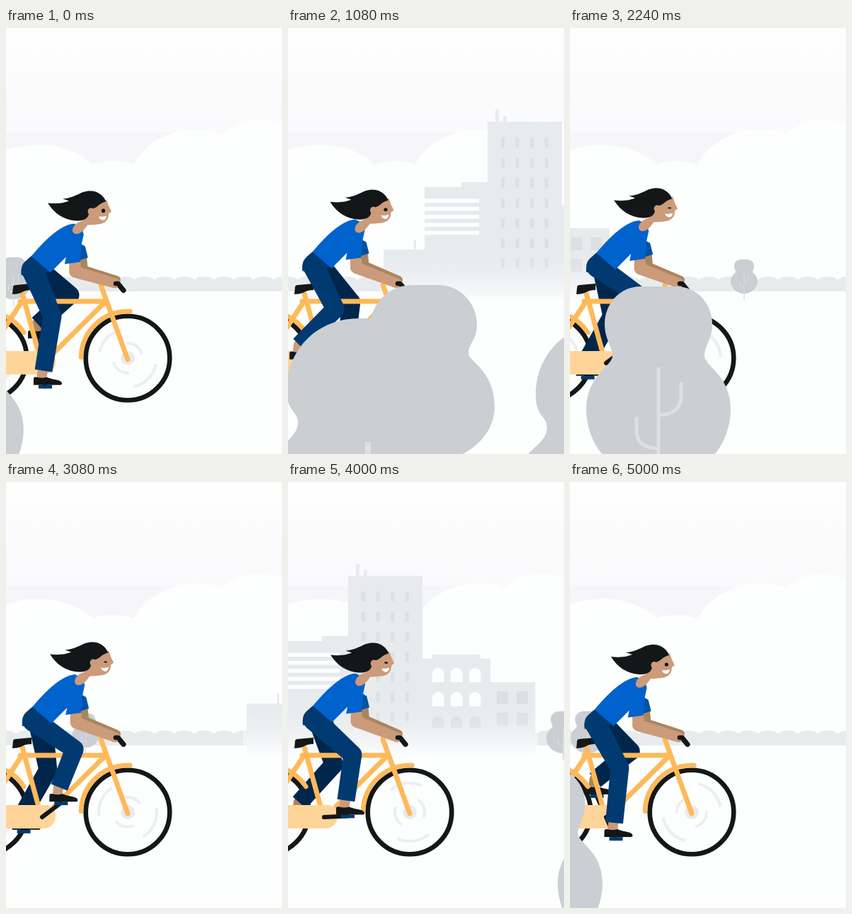
These frames come from a looping animation (390x600 px, 5.04 s). An HTML page with a canvas:

```html
<!DOCTYPE html>
<html lang="en">
<head>
<meta charset="utf-8">
<title>Cyclist</title>
<style>
html, body { margin: 0; width: 100%; height: 100%; overflow: hidden; background: #fdfefe; }
canvas { display: block; width: 390px; height: 600px; }
</style>
</head>
<body>
<canvas id="stage" width="390" height="600"></canvas>
<script>
const ctx = document.getElementById('stage').getContext('2d');
const LOOP = 5040, STEP = 40, TAU = Math.PI * 2, DEG = Math.PI / 180;
const C = {
  paper: '#fdfefe', haze: '#e8ebee', pane: '#dce0e4', tree: '#cbced3', trunk: '#dcdfe3',
  black: '#131718', orange: '#ffb959', guard: '#ffd498', navy: '#003a70', deep: '#00264c',
  shirt: '#0062cd', sleeve: '#0053a6', skin: '#cb9b7a', skinDark: '#a9855f'
};

function rect(x, y, w, h, color) {
  ctx.fillStyle = color;
  ctx.fillRect(x, y, w, h);
}
function fill(d, color) {
  ctx.fillStyle = color;
  ctx.fill(new Path2D(d));
}
function line(d, color, width, cap = 'round') {
  ctx.strokeStyle = color;
  ctx.lineWidth = width;
  ctx.lineCap = cap;
  ctx.lineJoin = 'round';
  ctx.stroke(new Path2D(d));
}
function oval(x, y, rx, ry, color) {
  ctx.fillStyle = color;
  ctx.beginPath();
  ctx.ellipse(x, y, rx, ry, 0, 0, TAU);
  ctx.fill();
}
function arc(x, y, r, from, to, color, width, cap = 'round') {
  ctx.strokeStyle = color;
  ctx.lineWidth = width;
  ctx.lineCap = cap;
  ctx.beginPath();
  ctx.arc(x, y, r, from * DEG, to * DEG);
  ctx.stroke();
}
function group(x, y, draw, sx = 1, sy = sx) {
  ctx.save();
  ctx.translate(x, y);
  ctx.scale(sx, sy);
  draw();
  ctx.restore();
}
function gradient(y0, y1, ...stops) {
  const g = ctx.createLinearGradient(0, y0, 0, y1);
  stops.forEach(([p, c]) => g.addColorStop(p, c));
  return g;
}

const sky = gradient(0, 147, [0, C.paper], [0.34, '#fdfdfe'], [0.35, '#fcfcfd'], [1, '#fafafc']);
const mist = gradient(318, 386, [0, 'rgba(253,254,254,0)'], [0.4, 'rgba(253,254,254,.18)'],
  [0.75, 'rgba(253,254,254,.58)'], [1, 'rgba(253,254,254,1)']);

// Position of something that passes x at time t0 while moving left at v px/ms.
function passing(t, x, t0, v) {
  const dt = ((t - t0 + LOOP * 1.5) % LOOP) - LOOP / 2;
  return x - v * dt;
}

function backdrop() {
  rect(0, 0, 390, 600, C.paper);
  rect(0, 0, 390, 147, sky);
  rect(0, 147, 390, 50, '#f6f5fa');
  fill('M0 172C45 157 95 165 122 192Q150 182 180 192C205 148 262 133 305 149C332 125 365 125 390 136V371H0Z', C.paper);
  rect(0, 357, 390, 14, C.haze);
  for (let x = 0; x < 410; x += 28) oval(x, 358, 15, 8, C.haze);
}

function city() {
  rect(135, 312, 58, 74, C.haze);
  rect(178, 298, 3, 15, C.haze);
  rect(193, 224, 89, 162, C.haze);
  rect(245, 217, 37, 8, C.haze);
  for (let i = 0; i < 5; i++) rect(193, 240.5 + i * 11.3, 77, 5.5, C.paper);

  rect(282, 132, 105, 254, C.haze);
  rect(293, 115, 5, 18, C.haze);
  rect(304, 124, 5, 9, C.haze);
  for (let row = 0; row < 7; row++)
    for (let col = 0; col < 4; col++) rect(301 + col * 20.6, 154.5 + row * 28.4, 5, 13.5, C.pane);

  rect(387, 249, 96, 137, C.haze);
  rect(400, 243, 69, 7, C.haze);
  for (let row = 0; row < 3; row++)
    for (let col = 0; col < 3; col++) {
      ctx.fillStyle = row < 2 ? C.paper : C.pane;
      ctx.beginPath();
      ctx.roundRect(401 + col * 26, 262 + row * 34, 16.5, row < 2 ? 20 : 16, [8, 8, 0, 0]);
      ctx.fill();
    }

  rect(483, 282, 63.5, 104, C.haze);
  for (const y of [295, 325])
    for (const x of [492, 520]) rect(x, y, 16, 18, C.pane);
  rect(130, 318, 420, 70, mist);
}

function tree(x, top, sx, sy = sx, stem = 270) {
  group(x, top, () => {
    if (stem > 270) line(`M0 240V${stem}`, C.trunk, 6, 'butt');
    fill('M-25 0H25C55 0 76 25 76 53C76 75 65 84 65 98C65 112 102 125 102 173C102 229 56 275 0 275' +
      'C-56 275 -102 229 -102 173C-102 125 -65 112 -65 98C-65 84 -76 75 -76 53C-76 25 -55 0 -25 0Z', C.tree);
    line(`M0 114V${stem}M32 135V153Q32 181 0 181M-31 184V202Q-31 228 0 228`, C.trunk, 5, 'butt');
  }, sx, sy);
}

function bush(x, y) {
  group(x, y, () => {
    fill('M-12 640V592C0 580 14 572 14 555C14 540 -2 540 -2 510C-2 452 42 409 100 409H117' +
      'C124 382 146 362 176 362H212C244 362 267 388 267 418C267 440 255 444 255 458C255 470 292 482 292 533' +
      'C292 563 272 590 240 603V640Z', C.tree);
    rect(108.5, 583, 8.5, 60, C.trunk);
  });
}

function wheel(x, y, spin) {
  oval(x, y, 10, 10, C.haze);
  for (const half of [0, 180]) {
    const a = spin + half;
    arc(x, y, 41, a - 33, a + 33, '#eceef1', 4, 'butt');
    arc(x, y, 21, a + 40, a + 120, '#eceef1', 4, 'butt');
  }
  arc(x, y, 59.3, 0, 360, C.black, 6.6);
}

// Tapered limb through points given as [x, y, radius]; the last end is cut flat.
function limb(points, color) {
  ctx.fillStyle = color;
  for (let i = 1; i < points.length; i++) {
    const [ax, ay, ar] = points[i - 1], [bx, by, br] = points[i];
    const d = Math.hypot(bx - ax, by - ay), nx = (ay - by) / d, ny = (bx - ax) / d;
    ctx.beginPath();
    ctx.moveTo(ax + nx * ar, ay + ny * ar);
    ctx.lineTo(bx + nx * br, by + ny * br);
    ctx.lineTo(bx - nx * br, by - ny * br);
    ctx.lineTo(ax - nx * ar, ay - ny * ar);
    ctx.fill();
    oval(ax, ay, ar, ar, color);
  }
}

const wave = (angle, phase) => Math.cos((angle - phase) * DEG);
const crank = { x: 51, y: 472, r: 33 };

function leg(angle, hip, color, skin) {
  const px = crank.x + crank.r * wave(angle, 0), py = crank.y + crank.r * wave(angle, 90);
  const kneeX = 78 + 19 * wave(angle, 312), kneeY = 391 + 17 * wave(angle, 112);
  line(`M${crank.x} ${crank.y}L${px} ${py}`, C.black, 6);
  rect(px - 9, py - 2, 19, 5, C.navy);
  limb([[px - 3, py - 23, 7], [px - 5, py - 9, 7]], skin);
  group(px, py, () =>
    fill('M-16 -2V-10Q-16 -14 -12 -13Q-4 -11 3 -13C10 -9 24 -10 24 -4Q24 -2 22 -2Z', C.black));
  limb([hip, [kneeX, kneeY, 13], [px - 2, py - 22, 12.5]], color);
}

function bikeFrame(spin) {
  wheel(172, 465, spin);
  arc(172, 465, 66, 181, 273, C.orange, 6.5);
  arc(-30, 465, 66, 260, 327, C.orange, 6.5);
  line('M22 386L-30 465M22 370L46 457M20 385H141L68 457M134 362L172 467', C.orange, 7);
  ctx.fillStyle = C.guard;
  ctx.beginPath();
  ctx.roundRect(-40, 455, 110, 33, [0, 14, 17, 0]);
  ctx.fill();
  fill('M10 365Q10 362 14 362L36 360V369Q27 369 21 373Q16 375 9 375Z', C.black);
  line('M151 361L158 360L166 369.5', C.black, 7);
}

function torso() {
  fill('M38 316C25 325 21 335 23 344L51 342L62 338Z', C.navy);
  fill('M104 298L113 303L117 319L104 323Z', C.sleeve);
  fill('M97 271C76 273 52 299 37 317L64 340L86 318L84 328L106 325L108 300L111 286L108 276Z', C.shirt);
}

function head(open) {
  fill('M119 255L110 268C102 270 95 276 96 283C99 290 109 287 117 274Q124 274 132 273' +
    'C142 272 147 267 147 258L151 255L147 247L144 238Z', C.skin);
  fill('M61 243C76 245 86 242 91 240L82 237C101 236 106 226 121 226C133 226 141 234 143 241' +
    'C132 244 130 251 123 251L117 263C112 268 106 268 101 268C84 267 70 258 61 243Z', C.black);
  oval(122, 255, 4.5, 5, C.skin);
  oval(139.5, 254, 2.6, 0.9 + 2.1 * open, C.black);
  fill('M133 262Q139 263 144 261Q143 268 138 267Q134 266 133 262Z', '#fff');
}

function rider(t) {
  const angle = 83 + t * 360 / 840, twice = angle * 2;
  const spin = 45 + t * 180 * 62 / LOOP;
  const dx = 2 * wave(twice, 250) - 1.4, dy = 3 * wave(twice, 170) + 1.4;
  const hx = 2.4 * wave(twice, 274) - 1.2, hy = 2.2 * wave(angle, 108) + 1.4;

  wheel(-30, 465, spin);
  leg(angle + 180, [49 + dx, 341 + dy, 17], C.deep, C.skinDark);
  bikeFrame(spin);
  line(`M${109 + dx} ${316 + dy}L${111 + dx} ${336 + dy}L156 355`, C.skinDark, 12);
  leg(angle, [38.5 + dx, 336 + dy, 15.5], C.navy, C.skin);
  limb([[98 + dx, 316 + dy, 7.5], [99 + dx, 339 + dy, 8.5], [154, 359.5, 7]], C.skin);
  oval(154, 359.5, 7.5, 7, C.skin);
  line('M155 360L158.5 360L166 369.5', C.black, 6.5);
  group(dx, dy, torso);
  group(hx, hy, () => head(0.5 + 0.5 * wave(angle, 120)));
}

function render(t) {
  backdrop();
  group(passing(t, 0, 1080, 0.423), 0, city);
  group(passing(t, -197, 4000, 0.437), 0, city);
  tree(passing(t, 316, 1800, 0.159), 326, 0.186, 0.175, 330);
  tree(passing(t, 389, 4000, 0.364), 323, 0.235, 0.215, 320);
  rider(t);
  tree(passing(t, 366, 1800, 0.5477), 364, 1);
  tree(passing(t, -50, 5000, 0.527), 403, 0.94);
  const bushX = passing(t, 0, 1080, 0.95);
  bush(bushX, 0);
  bush(bushX + 352, 7);
}

function tick() {
  render(Math.floor(performance.now() % LOOP / STEP) * STEP);
  requestAnimationFrame(tick);
}
tick();
</script>
</body>
</html>
```
